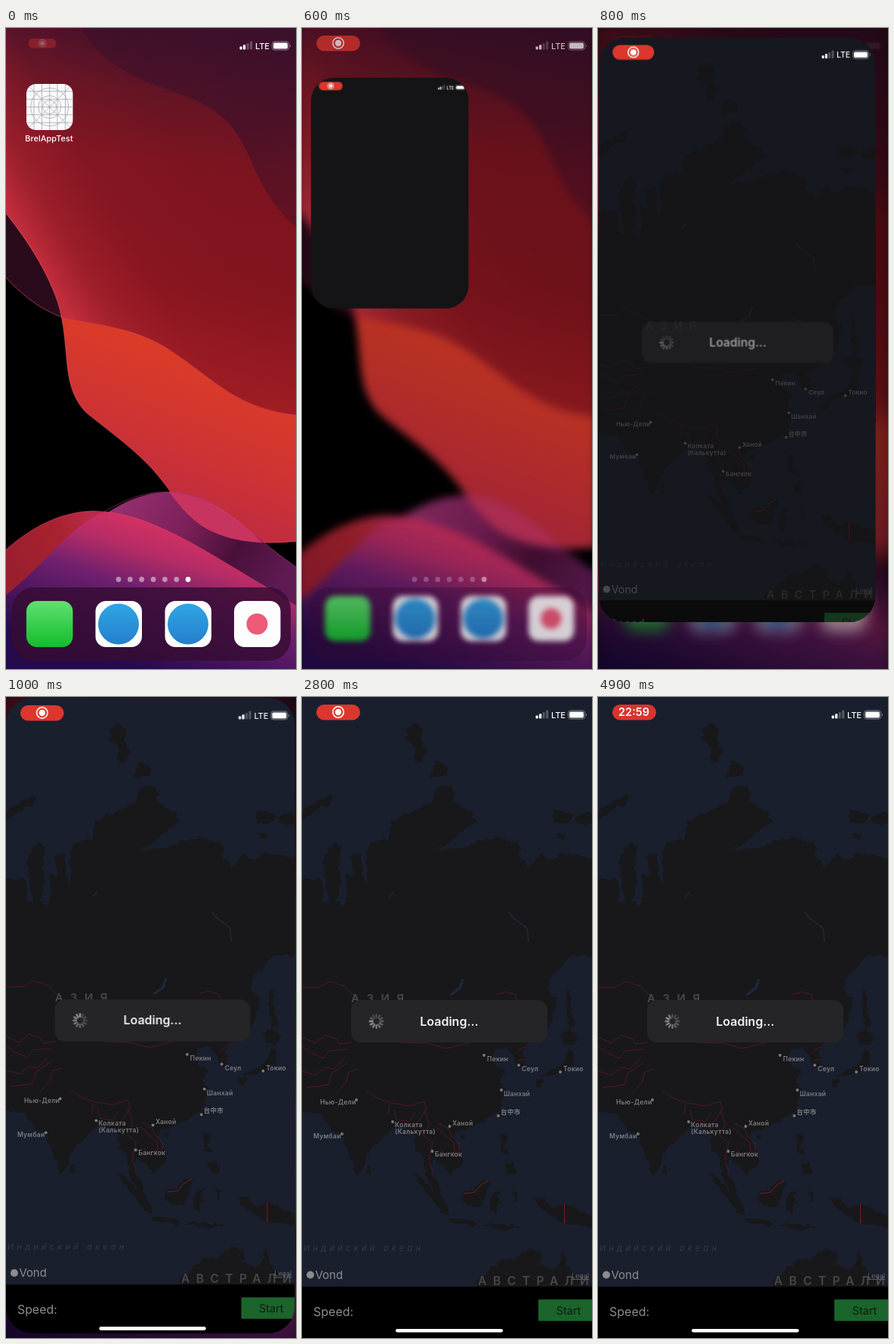
An HTML page that plays this animation: 384x848 px, repeating every 5 s.

```html
<!DOCTYPE html>
<html lang="ru">
<head>
<meta charset="utf-8">
<title>App launch</title>
<style>
html, body { margin: 0; width: 100%; height: 100%; overflow: hidden; background: #000; }
#stage { position: relative; width: 384px; height: 848px; overflow: hidden; background: #000; }
svg { position: absolute; left: 0; top: 0; display: block; font-family: Inter, "Noto Sans CJK SC", "Noto Sans", sans-serif; }
#card { position: absolute; left: 0; top: 0; width: 384px; overflow: hidden; background: #141416; transform-origin: 0 0; }
#card, .anim { animation: 5s linear infinite; }
.zoom { transform-origin: 192px 424px; }
#card { animation-name: open; }
#paper { animation-name: paper; }
#icons { animation-name: icons; }
#chrome { animation-name: chrome; }
#press { animation-name: press; }
#homebar { animation-name: homebar; }
#map { animation-name: map; }
#alert { animation-name: alert; transform-origin: 195px 429px; }
.pill { animation-name: pill; transform-origin: 48px 20px; }
.pill rect { animation: glow 5s linear infinite; }
.rec { animation-name: rec; }
.clock { animation-name: clock; }
.tick { stroke: #b4b4b8; stroke-width: 2; stroke-linecap: round; animation: tick 1s linear infinite; }

@keyframes open {
  0%, 10.9% { opacity: 0; transform: translate(27px, 74px) scale(.16); height: 384px; border-radius: 84px; }
  12% { opacity: 1; transform: translate(12px, 66px) scale(.54); height: 560px; border-radius: 56px; }
  14% { transform: translate(3px, 46px) scale(.854); height: 730px; border-radius: 38px; }
  16% { transform: translate(1px, 13px) scale(.954); height: 810px; border-radius: 36px; }
  18% { transform: translate(0, 4px) scale(.985); height: 836px; border-radius: 36px; }
  20% { transform: translate(0, 1px) scale(.9953); height: 845px; border-radius: 36px; }
  24%, 100% { opacity: 1; transform: none; height: 848px; border-radius: 0; }
}
@keyframes paper {
  0%, 10.9% { filter: blur(0) brightness(1); transform: scale(1); }
  14%, 100% { filter: blur(15px) brightness(.58); transform: scale(1.08); }
}
@keyframes icons {
  0%, 10.9% { filter: blur(0) brightness(1); transform: scale(1); opacity: 1; }
  14%, 100% { filter: blur(10px) brightness(.72); transform: scale(.945); opacity: .75; }
}
@keyframes chrome { 0%, 10.9% { opacity: 1; } 13%, 100% { opacity: 0; } }
@keyframes homebar { 0%, 10.9% { opacity: 1; } 14% { opacity: .2; } 17%, 100% { opacity: 0; } }
@keyframes press { 0%, 6% { opacity: 0; } 8%, 100% { opacity: .46; } }
@keyframes map { 0%, 14.5% { opacity: 0; } 18%, 100% { opacity: 1; } }
@keyframes alert {
  0%, 12% { opacity: 0; transform: translate(-4px, -14px) scale(1.08); }
  14% { opacity: .2; transform: translate(-4px, -13px) scale(1.05); }
  18%, 100% { opacity: 1; transform: none; }
}
@keyframes pill { 0% { opacity: .36; transform: scale(.64); } 5%, 100% { opacity: 1; transform: none; } }
@keyframes glow { 0%, 62% { fill: #db372e; } 72%, 82% { fill: #ec3030; } 96%, 100% { fill: #d9342f; } }
@keyframes rec { 0%, 64% { opacity: 1; } 68%, 100% { opacity: 0; } }
@keyframes clock { 0%, 66% { opacity: 0; } 70%, 100% { opacity: 1; } }
@keyframes tick { 0% { opacity: 1; } 75%, 96% { opacity: .3; } 100% { opacity: 1; } }
</style>
</head>
<body>
<div id="stage">
  <svg id="home" width="384" height="848" viewBox="0 0 384 848">
    <defs>
      <linearGradient id="top" x1="110" y1="0" x2="60" y2="510" gradientUnits="userSpaceOnUse">
        <stop offset="0" stop-color="#46102a"/><stop offset=".14" stop-color="#621424"/>
        <stop offset=".32" stop-color="#7c1420"/><stop offset=".65" stop-color="#84141e"/>
        <stop offset="1" stop-color="#a41e23"/>
      </linearGradient>
      <linearGradient id="rim" x1="20" y1="270" x2="230" y2="150" gradientUnits="userSpaceOnUse">
        <stop offset="0" stop-color="#cc3242" stop-opacity=".85"/><stop offset=".2" stop-color="#c02c3a" stop-opacity=".42"/>
        <stop offset=".5" stop-color="#b02432" stop-opacity=".14"/><stop offset="1" stop-color="#a01c28" stop-opacity="0"/>
      </linearGradient>
      <linearGradient id="corner" x1="250" y1="0" x2="384" y2="270" gradientUnits="userSpaceOnUse">
        <stop offset="0" stop-color="#38102a"/><stop offset=".5" stop-color="#2c0e2c"/>
        <stop offset="1" stop-color="#4a1026"/>
      </linearGradient>
      <linearGradient id="band" x1="280" y1="440" x2="205" y2="630" gradientUnits="userSpaceOnUse">
        <stop offset="0" stop-color="#dc3c27"/><stop offset=".45" stop-color="#d23530"/><stop offset="1" stop-color="#c02b40"/>
      </linearGradient>
      <linearGradient id="dome" x1="150" y1="620" x2="360" y2="740" gradientUnits="userSpaceOnUse">
        <stop offset="0" stop-color="#96306e"/><stop offset=".4" stop-color="#7c205a"/>
        <stop offset=".7" stop-color="#4a1038"/><stop offset="1" stop-color="#5e1a52"/>
      </linearGradient>
      <linearGradient id="redhill" x1="0" y1="690" x2="110" y2="645" gradientUnits="userSpaceOnUse">
        <stop offset="0" stop-color="#9a1f2e"/><stop offset=".6" stop-color="#a8222f"/><stop offset="1" stop-color="#b82a48"/>
      </linearGradient>
      <linearGradient id="pink" x1="210" y1="645" x2="150" y2="838" gradientUnits="userSpaceOnUse">
        <stop offset="0" stop-color="#de3260"/><stop offset=".27" stop-color="#b42c66"/>
        <stop offset=".5" stop-color="#70206e"/><stop offset="1" stop-color="#260b4a"/>
      </linearGradient>
      <linearGradient id="green" x1="0" y1="0" x2="0" y2="1">
        <stop offset="0" stop-color="#5fe070"/><stop offset="1" stop-color="#14bd2c"/>
      </linearGradient>
      <linearGradient id="blue" x1="0" y1="0" x2="0" y2="1">
        <stop offset="0" stop-color="#2fa5e4"/><stop offset="1" stop-color="#2480cc"/>
      </linearGradient>
    </defs>
    <g id="paper" class="anim zoom">
      <rect width="384" height="848"/>
      <path fill="#2a0b1c" d="M0 245V330C25 357 48 374 78 384L90 330L30 240Z"/>
      <path fill="url(#band)" d="M0 0V245C28 280 52 318 66 355C77 385 78 415 81 445C84 475 92 495 108 510C135 532 160 549 187 576C216 605 228 634 254 655C285 678 335 684 384 679V0Z"/>
      <path id="veil" fill="url(#top)" d="M0 0V245C28 280 52 318 66 355Q72 370 74 383C128 394 172 397 215 425C275 464 305 504 384 512V0Z"/>
      <use href="#veil" style="fill:none"/>
      <path fill="url(#rim)" d="M0 0V245C28 280 52 318 66 355Q72 370 74 383C128 394 172 397 215 425C275 464 305 504 384 512V0Z"/>
      <path fill="url(#corner)" opacity=".5" d="M100 0C125 45 165 65 215 82C270 100 300 118 322 170C340 215 362 245 384 264V0Z"/>
      <g fill="none" stroke="#e0485c" stroke-opacity=".6" stroke-width="1.4">
        <path d="M0 245C28 280 52 318 66 355C77 385 78 415 81 445C84 475 92 495 108 510C135 532 160 549 187 576C216 605 228 634 254 655C285 678 335 684 384 679"/>
        <path stroke-opacity=".38" d="M0 330C25 357 48 374 78 384C128 394 172 397 215 425C275 464 305 504 384 512"/>
      </g>
      <path fill="url(#dome)" d="M110 660C150 625 190 612 222 614C285 620 315 665 384 713V848H110Z"/>
      <path fill="#c83460" d="M216 614C230 632 240 644 254 655C278 673 312 680 340 681C312 655 276 618 216 614Z"/>
      <path fill="url(#redhill)" d="M0 690C40 655 78 640 115 639C150 640 140 650 100 690L0 770Z"/>
      <path fill="url(#pink)" d="M0 750C50 712 85 658 130 640C195 645 262 691 345 740L384 764V848H0Z"/>
      <path fill="none" stroke="#e0406c" stroke-opacity=".6" d="M0 690C40 655 78 640 115 639C190 640 262 691 345 740"/>
      <path fill="none" stroke="#c04a90" stroke-opacity=".5" d="M130 640C165 620 190 612 222 614C285 620 315 665 384 713"/>
    </g>
    <g id="chrome" class="anim">
      <rect x="8" y="740" width="369" height="97" rx="29" fill="#360d34" fill-opacity=".82"/>
      <g id="dots" fill="#fff"></g>
      <rect x="27" y="74" width="61.5" height="61" rx="13" fill="#fbfbfc"/>
      <g id="grid" fill="none" stroke="#a4a4ac" stroke-width=".8"></g>
      <rect id="press" class="anim" x="27" y="74" width="61.5" height="61" rx="13"/>
      <text x="57" y="150" font-size="11" font-weight="500" fill="#fff" text-anchor="middle">BrelAppTest</text>
    </g>
    <g id="icons" class="anim zoom">
      <rect x="27" y="758" width="61.5" height="61" rx="14" fill="url(#green)"/>
      <g fill="#fdfdfd">
        <rect x="118.5" y="758" width="61.5" height="61" rx="14"/>
        <rect x="210.5" y="758" width="61.5" height="61" rx="14"/>
        <rect x="302" y="758" width="61.5" height="61" rx="14"/>
      </g>
      <circle cx="149" cy="788.5" r="27" fill="url(#blue)"/>
      <circle cx="241" cy="788.5" r="27" fill="url(#blue)"/>
      <circle cx="332.5" cy="788.5" r="14" fill="#ee5a78"/>
    </g>
    <g id="homebar" class="anim"></g>
  </svg>

  <div id="card">
    <svg width="384" height="848" viewBox="0 0 384 848">
      <defs>
        <filter id="rough" x="-5%" y="-5%" width="110%" height="110%" color-interpolation-filters="sRGB">
          <feTurbulence type="fractalNoise" baseFrequency=".13" numOctaves="2" seed="4"/>
          <feDisplacementMap in="SourceGraphic" scale="8" xChannelSelector="R" yChannelSelector="G"/>
        </filter>
        <clipPath id="view"><rect width="384" height="780"/></clipPath>
      </defs>
      <g id="map" class="anim">
        <rect width="384" height="780" fill="#1a1f2e"/>
        <g clip-path="url(#view)">
          <g filter="url(#rough)" fill="#18181a">
            <path d="M-9 237L12 243 22 238 29 252 27 268 36 276 31 240 28 220 35 200 45 192 52 198 48 225 52 245 45 270 56 276 61 255 58 235 70 238 64 210 78 205 80 225 82 252 87 235 84 210 92 192 115 188 118 165 135 156 152 150 172 138 178 120 195 117 204 128 200 140 226 152 230 164 215 176 200 190 178 203 215 199 235 190 262 185 272 192 286 190 291 214 301 226 315 207 330 216 345 206 392 216V343H355L330 371 322 388H-9Z"/>
            <path d="M-9 370H330L322 386 338 398 334 420 325 440 306 455 292 466 296 488 286 490 279 472 266 463 251 471 257 485 269 495 262 509 270 522 262 546 240 562 216 572 205 575 200 585 212 600 210 620 195 633 185 620 173 612 169 625 181 645 187 666 178 660 165 635 160 605 150 600 148 580 138 568 120 570 100 590 86 605 81 625 73 633 62 605 52 576 40 576 25 552-9 547Z"/>
            <path d="M-9 162L8 145 20 138 40 129 36 142 18 150 2 162ZM139 42L150 34 160 42 157 58 166 72 155 88 146 80 150 66 138 56ZM170 106L178 84 192 92 192 104 180 106ZM331 152L346 148 358 158 350 168 336 166ZM362 158L378 152 392 156V168L366 168ZM334 180L350 182 344 190Z"/>
            <path d="M350 388L356 392 356 412 362 432 354 442 351 420ZM342 446L354 438 367 450 356 460 346 458ZM353 464L361 472 357 486 345 497 328 501 314 504 326 494 340 490 350 478ZM311 504L319 506 318 519 311 515ZM261 546L266 548 263 559 259 555ZM208 580L216 578 214 586ZM85 617L91 622 91 632 85 630Z"/>
            <path d="M148 632L158 636 176 655 192 672 197 688 186 682 168 660ZM194 690L214 690 232 696 228 701 198 695ZM211 655L228 652 238 640 249 642 244 656 237 674 220 675 213 667ZM250 662L254 655 266 654 258 660 264 670 258 672 258 684 251 680ZM262 580L271 582 268 596 276 606 264 600ZM268 618L280 616 283 632 272 630ZM238 698L262 697 290 701 268 706ZM280 652L286 656 282 668Z"/>
            <path d="M308 664L322 664 330 676 347 670 392 688V705L368 698 350 697 330 688 316 676ZM230 792L232 772 246 760 262 746 284 742 300 730 318 735 315 750 334 760 342 746 346 730 353 755 366 768 392 782V792Z"/>
          </g>
          <g fill="none" stroke="#1d2940" stroke-width="1.5">
            <path stroke-width="3" d="M213 373L209 385 197 394"/>
            <path d="M274 285L280 292 298 306 300 324M115 264L122 258"/>
          </g>
          <g fill="none" stroke="#521626" stroke-linejoin="round">
            <path d="M0 384L22 384 38 376 56 383 66 392 72 401M0 450L18 458 30 447 45 452 50 459 66 457M0 461L10 470 28 478 36 468 60 466M0 495L18 500 30 490 42 492 56 478M6 517L35 513 40 497 60 484M45 524L58 510 62 496 74 492"/>
            <path d="M86 522L100 531 118 537 142 541 162 535 165 546 155 560 146 576M122 546L125 559 142 562 150 549M116 539L114 552M162 546L169 565 161 580 173 590 168 612 173 628M178 570L190 580 201 590 202 602 190 606 183 598M181 564L194 571 198 581 209 592 206 606M258 393L270 390 283 394 285 402M130 457L165 458 191 465 222 457M284 470L300 459M287 481L295 478"/>
            <path stroke="#7a1c28" d="M214 657L229 655 237 645 247 640M347.5 670V697"/>
          </g>
          <g fill="#47474a" font-weight="600">
            <text x="65" y="404" font-size="15" letter-spacing="9.5">АЗИЯ</text>
            <text x="233" y="778" font-size="15.5" letter-spacing="8.6">АВСТРАЛИЯ</text>
          </g>
          <text x="2" y="733" font-size="11" font-style="italic" letter-spacing="4.3" fill="#303a4e">Индийский океан</text>
          <g id="cities" fill="#7d7d80" font-size="8.5" font-weight="600" letter-spacing=".3"></g>
          <circle cx="11" cy="764.5" r="5" fill="#8c8c90"/>
          <text x="17.5" y="770" font-size="15" fill="#8c8c90">Vond</text>
          <text x="357" y="769" font-size="9" fill="#68686c" text-decoration="underline">Legal</text>
        </g>
        <rect y="780" width="384" height="68"/>
        <text x="15" y="818.5" font-size="16" fill="#8c8c8c">Speed:</text>
        <rect x="313" y="797" width="80" height="28.5" fill="#1b642b"/>
        <text x="353" y="816.5" font-size="14.5" fill="#0c1e10" text-anchor="middle">Start</text>
        <rect x="124" y="836" width="142" height="4.6" rx="2.3" fill="#fff"/>
      </g>
      <g id="alert" class="anim">
        <rect x="65" y="401" width="260" height="56" rx="13" fill="#252427"/>
        <g id="spinner"></g>
        <text x="195" y="434.5" font-size="16" font-weight="600" fill="#f2f2f4" text-anchor="middle">Loading...</text>
      </g>
      <g id="appbar"></g>
    </svg>
  </div>
</div>
<script>
const put = (id, html) => { document.getElementById(id).innerHTML = html; };
const range = (n, fn) => Array.from({ length: n }, (_, i) => fn(i)).join('');

// Status bar, shared by the home screen and the app
const bars = range(4, i => {
  const h = 4 + i * 2.3;
  return `<rect x="${309.5 + i * 4.5}" y="${28.5 - h}" width="3.2" height="${h}" rx=".8" fill-opacity="${i < 2 ? 1 : .25}"/>`;
});
const status = `
  <g class="pill anim">
    <rect x="19" y="10" width="58" height="20.5" rx="10.2"/>
    <g class="rec anim"><circle cx="48" cy="20" r="7.2" fill="none" stroke="#fff" stroke-width="1.6"/><circle cx="48" cy="20" r="4.2" fill="#fff"/></g>
    <text class="clock anim" x="47.5" y="25.3" font-size="14.5" font-weight="600" fill="#fff" text-anchor="middle">22:59</text>
  </g>
  <g fill="#fff">${bars}
    <text x="330" y="28" font-size="11" font-weight="500">LTE</text>
    <rect x="352.5" y="18" width="22" height="11" rx="3.2" fill="none" stroke="#fff" stroke-opacity=".45"/>
    <rect x="354" y="19.5" width="19" height="8" rx="1.8"/>
    <path d="M376 21.5q2 2 0 4z" fill-opacity=".5"/>
  </g>`;
put('homebar', status);
put('appbar', status);

put('dots', range(7, i => `<circle cx="${149 + i * 15.35}" cy="729.5" r="3.4" fill-opacity="${i < 6 ? .48 : 1}"/>`));

// Blank app icon: ruled square, diagonals and rings
const ruled = [37, 47.5, 57.75, 68, 78.5].map(x => `M${x} 74V135M27 ${x + 46.75}H88.5`).join('');
put('grid', `<path d="${ruled}M30 77L85.5 132M85.5 77L30 132"/>` +
  [9, 15, 25].map(r => `<circle cx="57.75" cy="104.5" r="${r}"/>`).join(''));

// Ticks brighten one after another, once around per second
put('spinner', range(12, i =>
  `<path class="tick" d="M98.5 424V420" transform="rotate(${i * 30} 98.5 429)" style="animation-delay:${i / 12 - 1}s"/>`));

const cities = [
  ['Пекин', 241, 474, 245, 482], ['Сеул', 287, 487, 291, 495], ['Токио', 342, 496, 346, 495],
  ['Шанхай', 264, 520, 267, 528], ['台中市', 260, 554, 263, 552], ['Нью-Дели', 72, 533, 24, 539],
  ['Мумбаи', 53, 578, 15, 584], ['Колката', 120, 562, 123, 569], ['Ханой', 195.5, 568, 199, 567],
  ['Бангкок', 172.5, 601, 176, 608]
];
put('cities', cities.map(([name, cx, cy, x, y]) =>
  `<circle cx="${cx}" cy="${cy}" r="1.9"/><text x="${x}" y="${y}">${name}</text>`).join('') +
  '<text x="123" y="578">(Калькутта)</text>');
</script>
</body>
</html>
```
